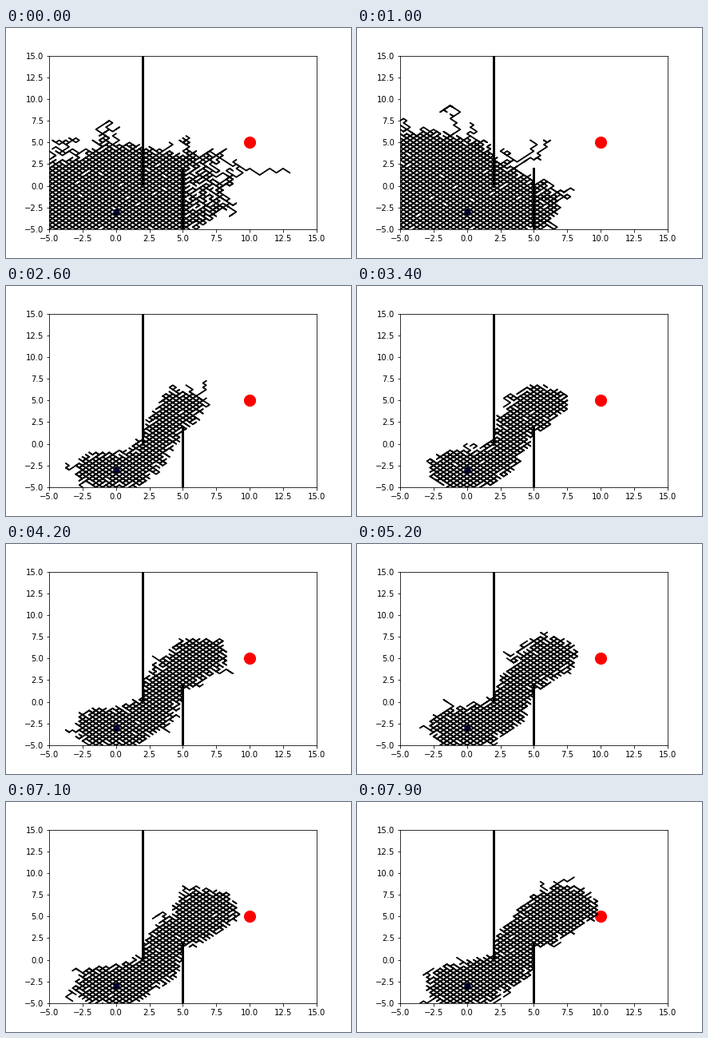
Animation of 432x288 px, one loop 8 s. Source, as a matplotlib script:

```python
import numpy as np
import matplotlib.pyplot as plt
from matplotlib.animation import FuncAnimation
from matplotlib.collections import LineCollection

STEP = 0.25
FRAMES = 80
SETTLED = 20  # from here on the swarm keeps to the gap between the walls

fig, ax = plt.subplots(figsize=(6, 4), dpi=72)
fig.subplots_adjust(left=0.125, right=0.9, bottom=0.125, top=0.88)
ticks = np.arange(-5, 15.1, 2.5)
ax.set(xlim=(-5, 15), ylim=(-5, 15), xticks=ticks, yticks=ticks)

ax.scatter(10, 5, s=200, color="red", zorder=1)
ax.scatter(0, -3, s=50, color="#00002c", zorder=3)
ax.plot([2, 2], [0, 15], color="black", lw=3, zorder=3)
ax.plot([5, 5], [-5, 2], color="black", lw=3, zorder=3)


def line_layer():
    layer = LineCollection([], colors="black", linewidths=1.5,
                           capstyle="projecting", joinstyle="round", zorder=2)
    ax.add_collection(layer, autolim=False)
    return layer


mesh, strands = line_layer(), line_layer()

# One diagonal edge per lattice cell
I, J = (g.ravel() for g in np.meshgrid(np.arange(-22, 56), np.arange(-22, 60)))
ODD = (I + J) % 2
EDGES = np.stack([np.column_stack([I, J + ODD]),
                  np.column_stack([I + 1, J + 1 - ODD])], axis=1) * STEP
MID = np.column_stack([I + 0.5, J + 0.5]) * STEP
WALLED = (((MID[:, 0] < 2) & (MID[:, 1] > 0.6))
          | ((MID[:, 0] > 5) & (MID[:, 1] < 1.6)))

# Swarm body as a chain of discs: x, y, radius
SPREAD = np.array([(-5, -2, 5), (-2, -2, 5.5), (1, -1, 6), (3, -1, 5),
                   (4.5, -1, 3.8)])
LEANING = np.array([(-5, -1, 5.5), (-3, 0, 6.3), (-1, -1, 5), (1, -2, 5),
                    (3.5, -2, 3.4)])
NARROW = np.array([(-.8, -3, 2.1), (.6, -3, 2.1), (2.4, -1.5, 1.6),
                   (3.4, 1.3, 1.5), (4.9, 4.4, 1.9)])
REACHING = np.array([(-.6, -2.8, 2.5), (.6, -2.7, 2.5), (2.8, -1.2, 2),
                     (4.1, 2.3, 2), (7.2, 6, 2.7)])


def mix(a, b, t):
    return a + (b - a) * t


def body(n):
    if n < 10:
        return mix(SPREAD, LEANING, n / 10)
    if n < SETTLED:
        return mix(LEANING, NARROW, (n - 10) / (SETTLED - 10))
    return mix(NARROW, REACHING,
               np.interp(n, [26, 42, 62, 79], [0, 0.5, 0.55, 1]))


def depth_in(chain):
    """How deep each cell lies inside the tapered chain."""
    depth = np.full(len(MID), -np.inf)
    for a, b in zip(chain, chain[1:]):
        axis = b[:2] - a[:2]
        t = np.clip((MID - a[:2]) @ axis / (axis @ axis), 0, 1)
        gap = np.hypot(*(MID - a[:2] - t[:, None] * axis).T)
        depth = np.maximum(depth, mix(a[2], b[2], t) - gap)
    return depth


def walk(rng, start, steps, right=0.5, up=0.5):
    i, j = np.round(np.array(start) / STEP).astype(int)
    j += (i + j) % 2
    moves = np.where(rng.random((steps, 2)) < (right, up), 1, -1)
    path = np.vstack([(i, j), (i, j) + np.cumsum(moves, axis=0)]) * STEP
    x, y = path.T
    # Stop at the first wall
    hit = (((x[:-1] - 2) * (x[1:] - 2) <= 0) & (y[1:] > 0)
           | ((x[:-1] - 5) * (x[1:] - 5) <= 0) & (y[1:] < 2))
    return path[:np.argmax(hit) + 1] if hit.any() else path


def draw(n):
    rng = np.random.default_rng(500 + n)
    early = n < SETTLED
    chain = body(n)
    chain = chain + rng.normal(0, 0.2 if early else 0.08, chain.shape)
    depth = depth_in(chain)
    if not early:
        depth[WALLED] = -1

    keep = np.where(depth > 0.6, 0.99, 0.75)
    if early:
        keep = np.where(MID[:, 0] > 5.2, 0.7, keep)
    filled = EDGES[(depth > 0.1) & (rng.random(len(MID)) < keep)]
    # Many walkers share each edge, so it is stroked several times
    mesh.set_segments(np.repeat(filled, 4, axis=0))

    rim = MID[(np.abs(depth - 0.2) < 0.15) & (MID[:, 1] > -5)
              & (MID[:, 0] > -5)]
    longest = 36 if early else 8
    lines = []
    for start in rng.permutation(rim)[:36]:
        up = 0.56 if early and start[1] > 1 else 0.5
        lines.append(walk(rng, start, rng.integers(3, longest), up=up))
    # A scout runs ahead towards the goal at first
    scout = int(32 * (1 - n / 10))
    if scout > 0:
        lines.append(walk(rng, (6, 2.5), scout, right=0.88, up=0.62))
    strands.set_segments(lines * 2)
    return mesh, strands


anim = FuncAnimation(fig, draw, frames=FRAMES, interval=100,
                     repeat=True, repeat_delay=0, blit=False)
plt.show()
```
